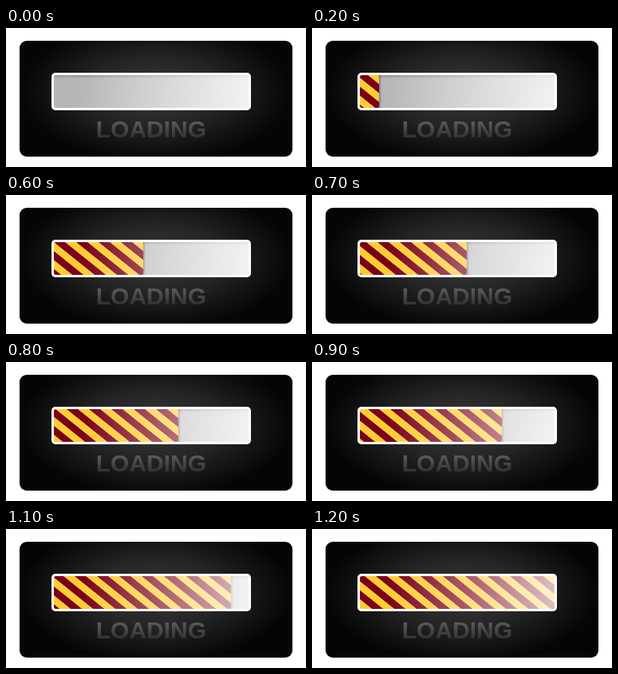
An HTML page for the animation above (1.3 s loop, 376 px wide and 174 px high).

```html
<!DOCTYPE html>
<html lang="en">
<head>
<meta charset="utf-8">
<title>Loading</title>
<style>
  html, body { margin: 0; width: 100%; height: 100%; overflow: hidden; background: #fff; }
  svg { display: block; }
  .label { font: bold 30px "Liberation Sans", Arial, sans-serif; }
  .bar { animation: fill 1300ms steps(13, end) infinite; }
  @keyframes fill { to { transform: translateX(286px); } }
</style>
</head>
<body>
<svg width="376" height="174" viewBox="0 0 376 174">
  <defs>
    <radialGradient id="panel" gradientUnits="userSpaceOnUse" cx="0" cy="0" r="1"
                    gradientTransform="translate(188 80) scale(172 88)">
      <stop offset="0" stop-color="#3a3a3a"/>
      <stop offset=".5" stop-color="#242424"/>
      <stop offset="1" stop-color="#050505"/>
    </radialGradient>
    <linearGradient id="track" gradientUnits="userSpaceOnUse" x1="60" y1="59" x2="290" y2="120">
      <stop offset="0" stop-color="#b4b4b4"/>
      <stop offset="1" stop-color="#c8c8c8"/>
    </linearGradient>
    <linearGradient id="gloss" gradientUnits="userSpaceOnUse" x1="95" y1="75" x2="304" y2="90">
      <stop offset="0" stop-color="#fff" stop-opacity="0"/>
      <stop offset="1" stop-color="#fff" stop-opacity=".75"/>
    </linearGradient>
    <linearGradient id="inset" x2="0" y2="1">
      <stop offset="0" stop-opacity=".2"/>
      <stop offset="1" stop-opacity="0"/>
    </linearGradient>
    <linearGradient id="edge">
      <stop offset="0" stop-opacity=".35"/>
      <stop offset="1" stop-opacity="0"/>
    </linearGradient>
    <linearGradient id="ink" gradientUnits="userSpaceOnUse" x1="0" y1="115" x2="0" y2="138">
      <stop offset="0" stop-color="#606060"/>
      <stop offset="1" stop-color="#303030"/>
    </linearGradient>
    <!-- bands end at the bar's leading edge, x = 40 -->
    <pattern id="bands" width="28" height="20" patternUnits="userSpaceOnUse"
             patternTransform="matrix(1 0 1.25 1 26 59)">
      <rect width="28" height="20" fill="#7b0019"/>
      <rect width="14" height="20" fill="#ffcc33"/>
    </pattern>
    <clipPath id="well"><rect x="60" y="59" width="244" height="41" rx="3"/></clipPath>
  </defs>

  <rect x="17" y="16" width="342" height="145" rx="9" fill="url(#panel)"/>
  <text class="label" x="112.8" y="137" fill="url(#ink)">LOADING</text>

  <rect x="57" y="56" width="250" height="47" rx="5" fill="#fff"/>
  <g clip-path="url(#well)">
    <rect x="60" y="59" width="244" height="41" fill="url(#track)"/>
    <rect x="60" y="59" width="244" height="4" fill="url(#inset)"/>
    <g class="bar">
      <rect x="40" y="59" width="3" height="41" fill="url(#edge)"/>
      <rect x="-240" y="59" width="280" height="41" rx="2" fill="url(#bands)"/>
    </g>
    <rect x="60" y="59" width="244" height="41" fill="url(#gloss)"/>
  </g>
</svg>
</body>
</html>
```
